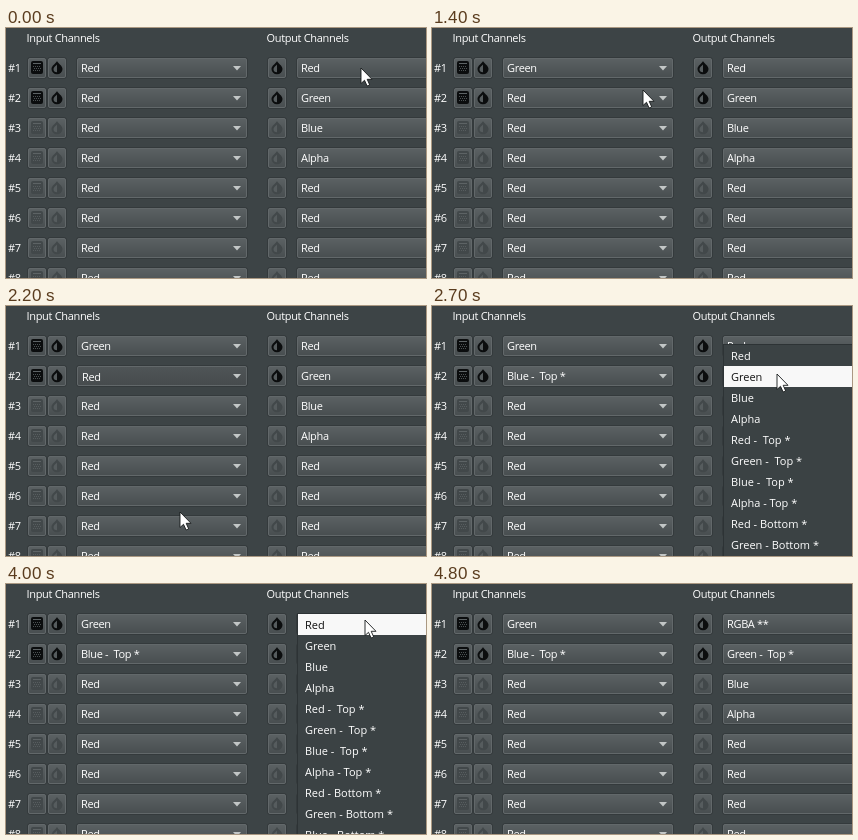
Recreate the animation shown at these times as an HTML page. Size 420x250 px, loop 6.2 s.

```html
<!DOCTYPE html>
<html lang="en">
<head>
<meta charset="utf-8">
<title>Channel mapping</title>
<style>
  html, body { margin: 0; width: 100%; height: 100%; overflow: hidden; background: #3d4446; }
  svg { display: block; width: 100%; height: 100%; }
  text { font: 11px "Open Sans", "Noto Sans", sans-serif; fill: #fff; letter-spacing: -.32px; white-space: pre; }
  .menu text { letter-spacing: 0; }
  .menu text.on { fill: #111; }
</style>
</head>
<body>
<svg id="stage" viewBox="0 0 420 250">
  <defs>
    <linearGradient id="face" x2="0" y2="1">
      <stop offset="0" stop-color="#5b6163"/><stop offset="1" stop-color="#484e50"/>
    </linearGradient>
    <linearGradient id="sunk" x2="0" y2="1">
      <stop offset="0" stop-color="#4f5557"/><stop offset="1" stop-color="#464b4d"/>
    </linearGradient>
  </defs>
</svg>
<script>
const LOOP = 6200, STEP = 100, PITCH = 30, ITEM = 21;
const COLORS = ['Red', 'Green', 'Blue', 'Alpha'];
const ITEMS = [
  ...COLORS,
  'Red -  Top *', 'Green -  Top *', 'Blue -  Top *', 'Alpha - Top *',
  ...COLORS.map(c => c + ' - Bottom *')
];

// Pointer stops: ms, x, y
const POINTER = [
  [0, 355, 40], [100, 268, 51], [200, 192, 46], [600, 192, 46], [800, 179, 63],
  [1000, 179, 63], [1100, 200, 65], [1300, 265, 70], [1400, 211, 62], [1500, 196, 68],
  [1600, 194, 70], [1700, 188, 108], [1800, 180, 162], [1900, 174, 206], [2200, 174, 206],
  [2300, 200, 188], [2400, 262, 135], [2500, 326, 86], [2600, 345, 68], [2800, 345, 68],
  [2900, 343, 86], [3100, 337, 142], [3200, 335, 161], [3700, 335, 161], [3800, 343, 102],
  [3900, 359, 36], [4100, 359, 36], [4200, 358, 64], [4400, 353, 186], [4500, 352, 226],
  [4800, 352, 226]
];
const POINTER_END = 4800;

// Each choice: field, menu open, release (pressed look), new value shown
const CHOICES = [
  { side: 'in', row: 0, open: 400, close: 1000, set: 1100, top: 29, value: 'Green' },
  { side: 'in', row: 1, open: 1600, close: 2200, set: 2300, top: 59, value: 'Blue -  Top *' },
  { side: 'out', row: 1, open: 2700, close: 3700, set: 3800, top: 38, value: 'Green -  Top *' },
  { side: 'out', row: 0, open: 4000, close: 4800, set: 4800, top: 29, value: 'RGBA **' }
];
const LEFT = { in: 71, out: 291 };

const stage = document.getElementById('stage');

function add(parent, tag, attrs = {}, text) {
  const el = document.createElementNS('http://www.w3.org/2000/svg', tag);
  for (const key in attrs) el.setAttribute(key, attrs[key]);
  if (text !== undefined) el.textContent = text;
  parent.appendChild(el);
  return el;
}
const label = (parent, x, y, text) => add(parent, 'text', { x, y }, text);

// Light rim inside a thin dark groove
function box(x, y, width) {
  add(stage, 'rect', { x: x - .5, y: y - .5, width: width + 1, height: 21, rx: 2.5, fill: 'none', stroke: '#343a3c' });
  return add(stage, 'rect', {
    x: x + .5, y: y + .5, width: width - 1, height: 19, rx: 1.5, fill: 'url(#face)', stroke: '#62686a'
  });
}

function ditherButton(x, y, color) {
  box(x, y, 18);
  add(stage, 'rect', { x: x + 3, y: y + 3, width: 12, height: 13, rx: 2, fill: color });
  add(stage, 'path', { d: `M${x + 5} ${y + 5.5}h8`, stroke: '#5d6365' });
  add(stage, 'path', {
    d: `M${x + 5} ${y + 8.5}h8M${x + 6} ${y + 10.5}h8M${x + 5} ${y + 12.5}h8`,
    stroke: '#5d6365', 'stroke-dasharray': '1 1', 'stroke-opacity': .8
  });
}

function dropButton(x, y, color) {
  box(x, y, 18);
  const cx = x + 9;
  add(stage, 'path', {
    d: `M${cx} ${y + 3}C${cx + 1} ${y + 5.5} ${cx + 5.5} ${y + 7.5} ${cx + 5.5} ${y + 11}
        a5.5 5.2 0 0 1 -11 0C${cx - 5.5} ${y + 7.5} ${cx - 1} ${y + 5.5} ${cx} ${y + 3}Z`, fill: color
  });
  add(stage, 'path', {
    d: `M${cx} ${y + 6.5}C${cx - 1} ${y + 8} ${cx - 3.5} ${y + 9} ${cx - 3.5} ${y + 11}a3.5 3.3 0 0 0 3.5 3.3Z`,
    fill: '#565c5e'
  });
}

function field(side, row) {
  const x = LEFT[side], y = 30 + row * PITCH;
  const rect = box(x, y, 170);
  if (side === 'in') add(stage, 'path', { d: `M${x + 156} ${y + 8}h8l-4 4.5z`, fill: '#c2c6c6' });
  const initial = side === 'out' && row < 4 ? COLORS[row] : 'Red';
  const text = label(stage, x + 4, y + 14, initial);
  return { rect, text, initial, x, y };
}

const fields = { in: [], out: [] };
label(stage, 20.5, 14, 'Input Channels');
label(stage, 260.5, 14, 'Output Channels');
for (let row = 0; row < 8; row++) {
  const y = 30 + row * PITCH, color = row < 2 ? '#0b0d0e' : '#42484a';
  label(stage, 2, y + 14, '#' + (row + 1));
  ditherButton(22, y, color);
  dropButton(42, y, color);
  dropButton(262, y, color);
  fields.in.push(field('in', row));
  fields.out.push(field('out', row));
}

function buildMenu({ side, top }) {
  const x = LEFT[side], group = add(stage, 'g', { class: 'menu' });
  for (let i = 3; i > 0; i--)
    add(group, 'rect', { x: x + 3, y: top + 3, width: 167 + i, height: 280, fill: '#000', 'fill-opacity': .12 });
  add(group, 'rect', { x: x + .5, y: top + .5, width: 169, height: 280, fill: '#3b4244', stroke: '#2d3335' });
  const bar = add(group, 'rect', { x: x + 1, width: 169, height: ITEM, fill: '#f8f8f8' });
  const texts = ITEMS.map((name, i) => label(group, x + 8, top + 16 + i * ITEM, name));
  return { group, bar, texts };
}
for (const choice of CHOICES) choice.menu = buildMenu(choice);

const pointer = add(stage, 'path', {
  d: 'M0 0V15.5L3.5 12.3L6.1 18L8.7 16.9L6.2 11.3H11Z',
  fill: '#fff', stroke: '#16191a', 'stroke-width': .9, 'stroke-linejoin': 'round'
});

function pointerAt(t) {
  const i = POINTER.findIndex(stop => stop[0] > t);
  if (i < 0) return POINTER.at(-1).slice(1);
  const [t0, x0, y0] = POINTER[i - 1], [t1, x1, y1] = POINTER[i];
  const k = (t - t0) / (t1 - t0);
  return [Math.round(x0 + (x1 - x0) * k), Math.round(y0 + (y1 - y0) * k)];
}

function draw(t) {
  const [px, py] = pointerAt(t);
  pointer.setAttribute('transform', `translate(${px} ${py})`);
  pointer.style.display = t < POINTER_END ? '' : 'none';

  for (const { side, row, open, close, set, top, value, menu } of CHOICES) {
    const { rect, text, initial, x, y } = fields[side][row];
    const isOpen = t >= open && t < close;
    const pressed = t >= open && t < set;
    text.textContent = t >= set ? value : initial;
    text.setAttribute('x', x + 4 + pressed);
    text.setAttribute('y', y + 14 + pressed);
    rect.setAttribute('fill', pressed ? 'url(#sunk)' : 'url(#face)');
    menu.group.style.display = isOpen ? '' : 'none';
    if (!isOpen) continue;
    const hover = Math.floor((py - top - 1) / ITEM);
    menu.bar.setAttribute('y', top + 1 + hover * ITEM);
    menu.texts.forEach((item, i) => item.classList.toggle('on', i === hover));
  }
}

const start = performance.now();
let shown = -1;
function tick() {
  const elapsed = Math.max(0, performance.now() - start) % LOOP;
  const t = Math.floor(elapsed / STEP) * STEP;
  if (t !== shown) draw(shown = t);
  requestAnimationFrame(tick);
}
tick();
</script>
</body>
</html>
```
